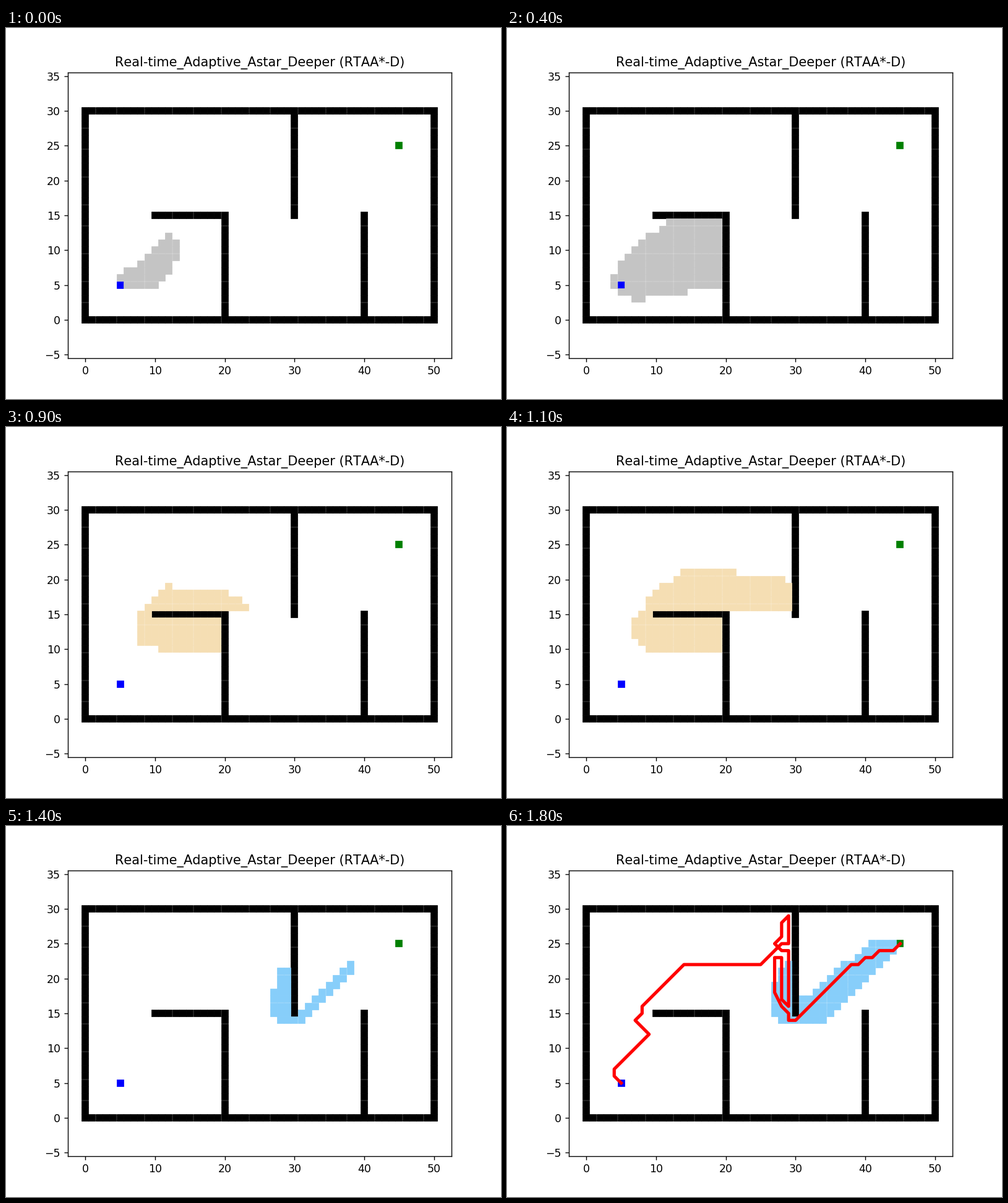
These frames come from a looping animation (800x600 px, 1.9 s). A matplotlib script:

```python
import itertools
import math

import matplotlib.pyplot as plt
from matplotlib.animation import FuncAnimation

START, GOAL = (5, 5), (45, 25)
RESTART = (9, 12)        # where the second search begins
CORNER = (9, 16)         # way around the end of the inner wall
GAP = (30, 14)           # way under the hanging wall
LEARNED_COST = 46.9      # path cost estimate left by the first search
SILVER_END = 163         # cells closed by the first search


def grid(x0, x1, y0, y1):
    """All cells of a box, ends included."""
    return list(itertools.product(range(x0, x1 + 1), range(y0, y1 + 1)))


def octile(a, b):
    """Length of the shortest 8-way walk on an open grid."""
    dx, dy = abs(a[0] - b[0]), abs(a[1] - b[1])
    return max(dx, dy) + (math.sqrt(2) - 1) * min(dx, dy)


WALLS = set(grid(0, 50, 0, 0) + grid(0, 50, 30, 30)
            + grid(0, 0, 0, 30) + grid(50, 50, 0, 30)
            + grid(10, 20, 15, 15) + grid(20, 20, 0, 15)
            + grid(30, 30, 15, 30) + grid(40, 40, 0, 15))


def first_search():
    def cost(c):
        return octile(START, c) + math.dist(c, GOAL)
    return sorted(grid(1, 19, 1, 14), key=cost)


def second_search(closed):
    def walked(c):
        x, y = c
        if x <= 9 or (x < 20 and y < 15):
            return octile(RESTART, c)
        return octile(RESTART, CORNER) + octile(CORNER, c)

    def estimate(c):
        if c in closed:
            return LEARNED_COST - octile(START, c)
        return math.dist(c, GOAL)

    cells = [c for c in grid(1, 29, 1, 29) if c not in WALLS]
    return sorted(cells, key=lambda c: walked(c) + estimate(c))


def third_search():
    def cost(c):
        return octile(GAP, c) + math.dist(c, GOAL)

    near = grid(27, 29, 15, 18) + grid(28, 29, 19, 21) + grid(28, 30, 14, 14)
    near.sort(key=lambda c: math.dist(c, (28, 17)))
    limit = cost(GOAL) + 1e-6
    far = [c for c in grid(31, 45, 10, 29)
           if c not in WALLS and cost(c) <= limit]
    return near + sorted(far, key=cost) + [(27, 19), (29, 22)]


def growth(color, order, steps, first, last, bend):
    """Show more of a search each step; bend > 0 slows it towards the end."""
    for k in range(steps):
        u = k / (steps - 1)
        count = round(first + (last - first) * (u + bend * u * (1 - u)))
        yield color, [c for c in order[:count] if c not in (START, GOAL)]


def walk(*stops):
    """Join the stops by moving diagonally first, then straight."""
    points = [stops[0]]
    for (x0, y0), (x1, y1) in zip(stops, stops[1:]):
        dx, dy = x1 - x0, y1 - y0
        n = min(abs(dx), abs(dy))
        bend = (x0 + math.copysign(n, dx), y0 + math.copysign(n, dy))
        points += [bend, (x1, y1)]
    return points


def full_path():
    wander = walk(START, (4, 7), RESTART, (7, 14), (8, 16), (25, 22),
                  (29, 25), (29, 29), (28, 26), (27, 25), (29, 24),
                  (29, 16), (28, 23), (27, 23), (27, 18))
    under_wall = walk((28, 16), (29, 14), GAP)
    stairs = [(38 + k, 22 + min(k // 2, 2)) for k in range(7)]
    return wander + under_wall + stairs + [GOAL]


silver = first_search()
wheat = second_search(set(silver[:SILVER_END]))
FRAMES = [
    *growth("#c4c4c4", silver, 7, 38, SILVER_END, 0.7),
    *growth("wheat", wheat, 6, 36, 207, -0.15),
    *growth("lightskyblue", third_search(), 6, 19, 90, 0.35),
]

plt.rcParams["text.kerning_factor"] = 6
fig, ax = plt.subplots(figsize=(6.4, 4.8), dpi=125)
ax.plot(*zip(*WALLS), "sk")
ax.plot(*START, "bs")
ax.plot(*GOAL, "gs")
visited, = ax.plot([], [], "s")
route, = ax.plot(*zip(*full_path()), "-r", linewidth=3)

half_height = 27.5 * 462 / 620
ax.set_xlim(-2.5, 52.5)
ax.set_ylim(15 - half_height, 15 + half_height)
ax.set_title("Real-time_Adaptive_Astar_Deeper (RTAA*-D)")


def draw(i):
    color, cells = FRAMES[i]
    visited.set_data(*zip(*cells))
    visited.set_color(color)
    route.set_visible(i == len(FRAMES) - 1)
    return visited, route


anim = FuncAnimation(fig, draw, frames=len(FRAMES), interval=100, repeat=True)
plt.show()
```
